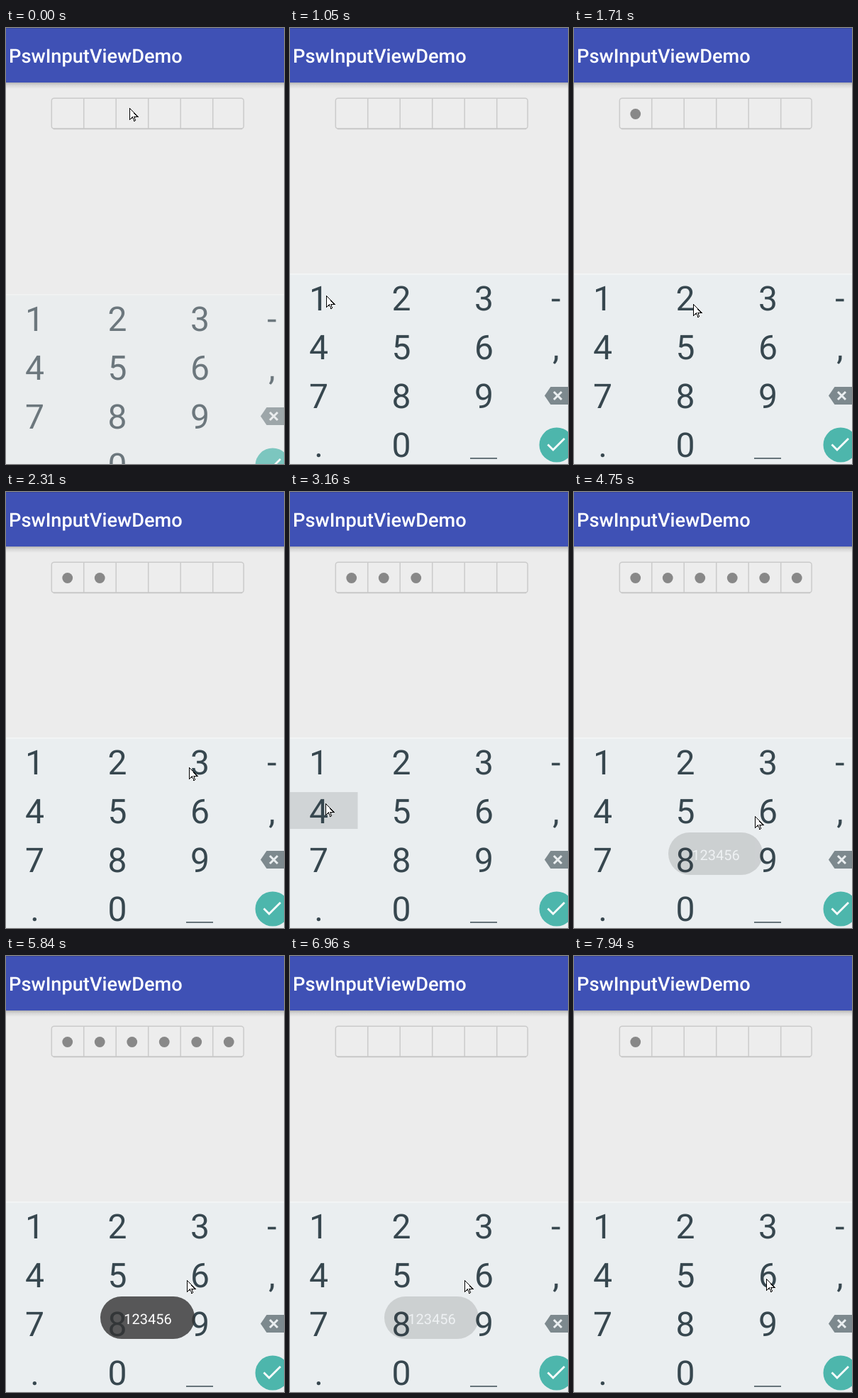
Recreate the animation shown at these times as an HTML page. Size 392 by 616 pixels, loop 8000 ms.

```html
<!DOCTYPE html>
<html lang="en">
<head>
<meta charset="utf-8">
<title>PswInputViewDemo</title>
<style>
  html, body { margin: 0; width: 100%; height: 100%; overflow: hidden; background: #ececec; }
  svg { display: block; width: 100vw; height: 100vh; font-family: Roboto, sans-serif; text-rendering: geometricPrecision; }
  .title { font-size: 27.2px; font-weight: 500; fill: #fff; }
  .key { font-size: 48px; fill: #37474f; text-anchor: middle; }
  .toast-text { font-size: 20px; fill: #fff; text-anchor: middle; }
</style>
</head>
<body>
<svg viewBox="0 0 392 616">
  <defs>
    <linearGradient id="shadow" x2="0" y2="1">
      <stop offset="0" stop-color="#b4b4b4"/>
      <stop offset=".4" stop-color="#d6d6d6"/>
      <stop offset="1" stop-color="#ececec"/>
    </linearGradient>
  </defs>
  <rect width="392" height="616" fill="#ececec"/>
  <rect y="77" width="392" height="9" fill="url(#shadow)"/>
  <rect width="392" height="77" fill="#3f51b5"/>
  <rect width="392" height="1" fill="#36469f"/>
  <text class="title" x="4" y="49">PswInputViewDemo</text>

  <g fill="none" stroke="#cbcbcb" stroke-width="1.5">
    <rect x="64.3" y="99.3" width="270.8" height="43" rx="3.5" fill="#ededed"/>
    <path d="M67 142.5H333" stroke="#c4c4c4"/>
    <path id="dividers"/>
  </g>
  <g id="dots" fill="#888"></g>

  <g id="keyboard">
    <rect y="347" width="392" height="300" fill="#eaeef0"/>
    <rect y="347" width="392" height="1.5" fill="#f5f7f7"/>
    <rect id="highlight" width="110" height="52" opacity=".11"/>
    <g id="keys"></g>
    <path d="M254 608H292" stroke="#66747a" stroke-width="2"/>
    <path d="M359 519.5L367.5 507H400V532H367.5Z" fill="#7d898e"/>
    <path d="M372 514L383 525M383 514L372 525" stroke="#eaeef0" stroke-width="3"/>
    <circle cx="376" cy="589" r="24.5" fill="#4db6ac"/>
    <path d="M363.5 588.5L371 596L387 580" fill="none" stroke="#fff" stroke-width="2.8"/>
  </g>

  <g id="toast">
    <rect x="133" y="481" width="133" height="60" rx="30" fill="#323232" fill-opacity=".8"/>
    <text class="toast-text" x="200" y="520">123456</text>
  </g>
  <path id="cursor" d="M.5 .5V16.5L4.5 13L7 18.5L8.5 17.5L6.5 12H11.5Z"
        fill="#fff" stroke="#000" shape-rendering="crispEdges"/>
</svg>
<script>
const LOOP = 8000;
const MOVE_STEP = 90, FADE_STEP = 80, FADE_STEPS = 5, HOLD = 85;
const CLEARED = 6490;
const $ = id => document.getElementById(id);

function add(parent, tag, attrs, text = '') {
  const el = document.createElementNS('http://www.w3.org/2000/svg', tag);
  for (const name in attrs) el.setAttribute(name, attrs[name]);
  el.textContent = text;
  return parent.appendChild(el);
}

const columnX = c => Math.min(40.5 + 116.5 * c, 375);
const rowY = r => 399 + 69 * r;
const cellX = i => 64.2 + 45.5 * i;

['123-', '456,', '789', '.0'].forEach((row, r) =>
  [...row].forEach((label, c) =>
    add($('keys'), 'text', { class: 'key', x: columnX(c), y: rowY(r) }, label)));

$('dividers').setAttribute('d',
  [1, 2, 3, 4, 5].map(i => `M${cellX(i)} 99V142`).join(''));
const dots = Array.from({ length: 6 }, (_, i) =>
  add($('dots'), 'circle', { cx: cellX(i + .495), cy: 121.5, r: 7.4 }));

const tap = (key, down, hold = HOLD) => ({ key, down, up: down + hold });
const taps = [
  tap(1, 1290), tap(2, 1980), tap(3, 2460), tap(4, 3160), tap(5, 3700),
  tap(6, 4510, 0), tap(6, 7860, 80)
];

const move = (start, end, x, y) => ({ start, end, x, y });
const moves = [
  move(0, 0, 174, 113),
  move(230, 500, 51, 358),
  move(680, 780, 51, 378),
  move(1460, 1550, 180, 390),
  move(1710, 1800, 156, 389),
  move(2140, 2310, 258, 389),
  move(2640, 3010, 50, 440),
  move(3340, 3430, 180, 457),
  move(3880, 4060, 255, 458),
  move(6570, 6650, 246, 458),
  move(7120, 7290, 249, 507),
  move(7370, 7610, 271, 456)
];

// The pointer travels in discrete eased steps, the last one landing at `end`.
function cursorAt(t) {
  const i = moves.findLastIndex(m => m.start <= t);
  const to = moves[i], from = moves[Math.max(i - 1, 0)];
  const steps = Math.round((to.end - to.start) / MOVE_STEP) + 1;
  const done = t >= to.end ? steps : Math.floor((t - to.start) / MOVE_STEP) + 1;
  const p = Math.min(done / steps, 1);
  const eased = p * p * (3 - 2 * p);
  const mix = axis => Math.round(from[axis] + (to[axis] - from[axis]) * eased);
  return [mix('x'), mix('y')];
}

function toastOpacity(t) {
  const fadeIn = Math.floor((t - 4670) / FADE_STEP);
  const fadeOut = FADE_STEPS - Math.floor((t - 6640) / FADE_STEP);
  return Math.max(0, Math.min(fadeIn, fadeOut, FADE_STEPS)) / FADE_STEPS;
}

const show = (el, on) => el.setAttribute('visibility', on ? 'visible' : 'hidden');

function draw(t) {
  const rising = t < 80;
  $('keyboard').setAttribute('transform', `translate(0 ${rising ? 29 : 0})`);
  $('keyboard').setAttribute('opacity', rising ? .7 : 1);

  const held = taps.find(({ down, up }) => down <= t && t < up);
  show($('highlight'), held);
  if (held) {
    const index = held.key - 1;
    $('highlight').setAttribute('x', columnX(index % 3) - 55);
    $('highlight').setAttribute('y', rowY(Math.floor(index / 3)) - 44);
  }

  const since = t < CLEARED ? 0 : CLEARED;
  const count = taps.filter(({ up }) => since <= up && up <= t).length;
  dots.forEach((dot, i) => show(dot, i < count));

  $('toast').setAttribute('opacity', toastOpacity(t));
  $('cursor').setAttribute('transform', `translate(${cursorAt(t)})`);
}

function tick() {
  draw(performance.now() % LOOP);
  requestAnimationFrame(tick);
}
tick();
</script>
</body>
</html>
```
